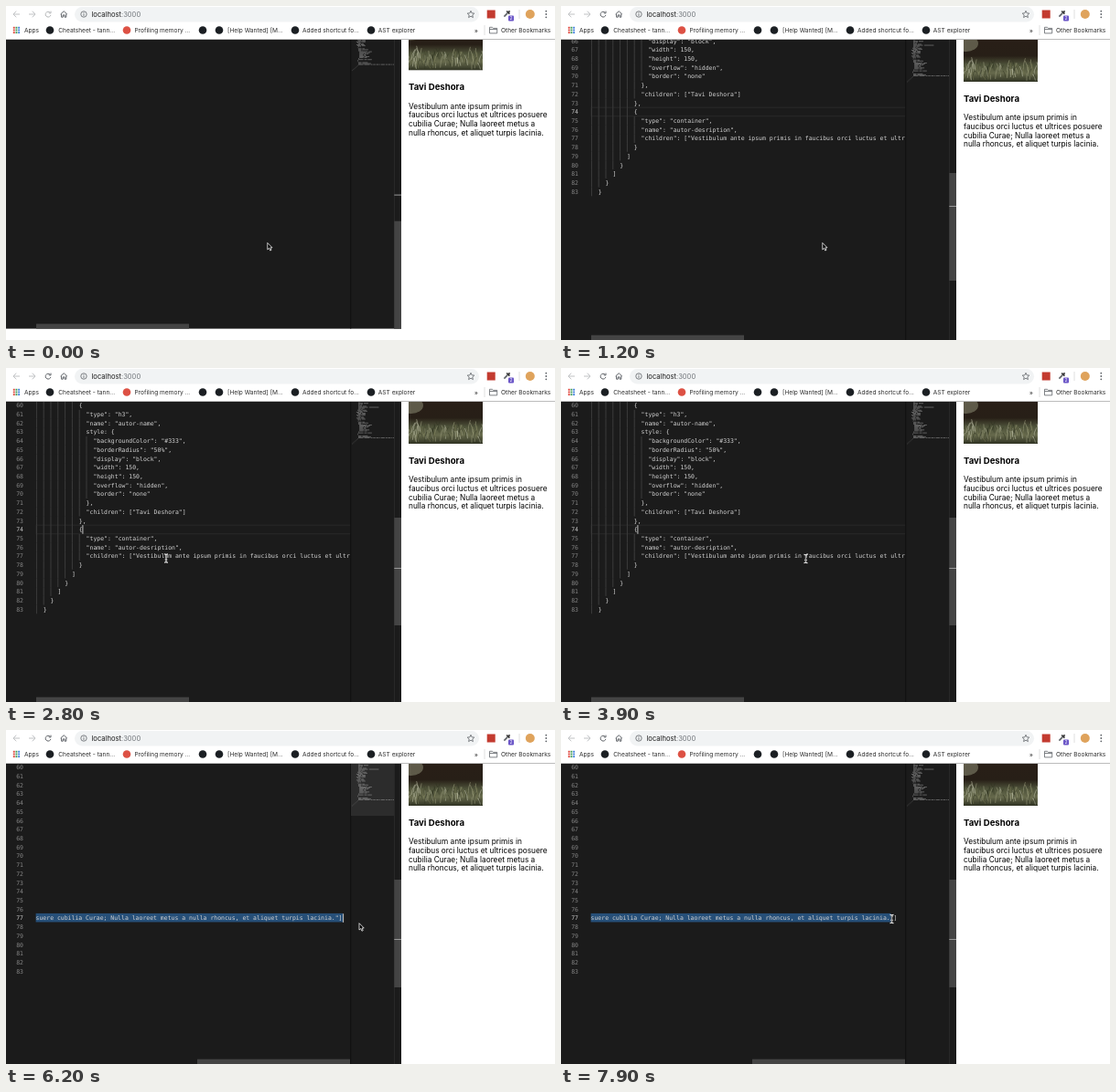
These frames come from a looping animation (600x366 px, 8 s). An HTML page:

```html
<!DOCTYPE html>
<html lang="en">
<head>
<meta charset="utf-8">
<title>Live layout editor</title>
<style>
  html, body { margin: 0; width: 100%; height: 100%; overflow: hidden; background: #fff; }
  svg { display: block; }
  text { font-family: Inter, "Liberation Sans", sans-serif; }
  .mono text { font: 6.478px "DejaVu Sans Mono", monospace; fill: #d2d2d2; }
  .mono .num { fill: #858585; text-anchor: end; }
  .mono .num.on { fill: #c6c6c6; }
  .bar text { font-size: 6.6px; fill: #2c2c2c; }
  .bar .address { font-size: 7.6px; fill: #1c1c1c; }
  .para text { font-size: 8.28px; }
  .icon { fill: none; stroke: #5f6368; stroke-width: 1; }
</style>
</head>
<body>
<svg width="600" height="366" viewBox="0 0 600 366">
  <defs>
    <clipPath id="codeClip"><rect x="32.6" y="0" width="343.6" height="366"/></clipPath>
    <clipPath id="mapClip"><rect x="377" y="0" width="47" height="366"/></clipPath>
    <clipPath id="photoClip"><rect x="440" y="20" width="81" height="63"/></clipPath>
    <linearGradient id="meadow" x2="0" y2="1">
      <stop offset="0" stop-color="#2a1e17"/><stop offset=".55" stop-color="#271f17"/>
      <stop offset=".7" stop-color="#4d5139"/><stop offset=".85" stop-color="#66694c"/>
      <stop offset="1" stop-color="#2f3222"/>
    </linearGradient>
  </defs>
  <rect width="600" height="366" fill="#fff"/>

  <g id="page">
    <rect width="432" height="366" fill="#1b1b1b"/>
    <g class="mono">
      <rect id="current" x="33" width="343.5" y="172.2" height="9.5" fill="none" stroke="#282828"/>
      <g id="nums"></g>
      <g clip-path="url(#codeClip)">
        <g id="code">
          <rect id="selection" y="200.9" height="9.6" fill="#264f78"/>
          <path id="guides" stroke="#464646" stroke-width=".8"/>
          <g id="lines"></g>
          <rect id="caret" width="1" height="9.6" fill="#c8c8c8"/>
        </g>
      </g>
    </g>
    <rect x="376.2" width="1" height="366" fill="#101010"/>
    <rect id="slider" x="377" y="37" width="47" height="57" fill="#2c2c2c"/>
    <g clip-path="url(#mapClip)"><path id="minimap" stroke="#b0b0b0" stroke-width=".65" opacity=".7"/></g>
    <rect x="424" width=".6" height="366" fill="#323232"/>
    <rect id="thumbV" x="424.3" y="164" width="7.7" height="118" fill="#444"/>
    <rect id="mark" x="424.3" width="7.7" height="1" fill="#999"/>
    <rect id="thumbH" y="360.7" width="167" height="5.3" fill="#444"/>

    <g clip-path="url(#photoClip)">
      <rect x="440" y="20" width="81" height="63" fill="url(#meadow)"/>
      <ellipse cx="443" cy="41" rx="13" ry="9" fill="#8b8a72" opacity=".55"/>
      <g id="grass" fill="none" stroke-width=".7"></g>
    </g>
    <text x="440" y="104.8" font-size="9.6" font-weight="700">Tavi Deshora</text>
    <g class="para">
      <text x="440" y="125.2">Vestibulum ante ipsum primis in</text>
      <text x="440" y="134.9">faucibus orci luctus et ultrices posuere</text>
      <text x="440" y="144.6">cubilia Curae; Nulla laoreet metus a</text>
      <text x="440" y="154.3">nulla rhoncus, et aliquet turpis lacinia.</text>
    </g>
  </g>
  <rect id="pageThumb" x="597" y="76" width="3" height="289" fill="#7c7c7c"/>

  <g class="bar">
    <rect width="600" height="37" fill="#fff"/>
    <rect y="36" width="600" height="1" fill="#bbb"/>
    <rect x="75" y="1" width="442" height="16.4" rx="8.2" fill="#f1f3f4"/>
    <g class="icon">
      <path d="M15 9H8m3.2-3.3L8 9l3.2 3.3M25 9h7m-3.2-3.3L32 9l-3.2 3.3" stroke="#c0c2c4"/>
      <path id="reload" d="M48.2 7.2A2.9 2.9 0 1 0 48.9 9.9M49 5.6V7.9H46.7"/>
      <path d="M59.6 9l3.6-3.3L66.8 9M60.6 8.6v3.6h1.7V9.9h1.8v2.3h1.7V8.6"/>
      <circle cx="85" cy="9" r="3.2" stroke-width=".8"/><path d="M85 8.5v2.3M85 6.9v.8" stroke-width=".9"/>
      <path d="M508 5.3l1.1 2.5 2.7.3-2 1.8.6 2.7-2.4-1.4-2.4 1.4.6-2.7-2-1.8 2.7-.3z" stroke-width=".8"/>
      <path d="M561 4v10M523 21v11" stroke="#ccc" stroke-width=".6"/>
      <path d="M528.5 23.3h3l1 1.1h4.2v5.5h-8.2zM528.5 25.5h8.2" stroke-width=".8"/>
      <path d="M544.4 11.6l3.8-4" stroke-width="1.6"/><path d="M547.2 5.5l3.2 3.2M549 7l1.6-1.6" stroke="#333" stroke-width="1.7"/>
    </g>
    <text class="address" x="93.5" y="11.8">localhost<tspan fill="#70757a">:3000</tspan></text>
    <rect x="525.7" y="4.5" width="9" height="9" fill="#c33b30"/>
    <rect x="549" y="10.5" width="6" height="6" rx="1" fill="#6a55c7"/>
    <text x="550.6" y="15.3" style="font-size:5px;fill:#fff">2</text>
    <circle cx="572.8" cy="9" r="5" fill="#dfa35c"/>
    <g fill="#5f6368"><circle cx="590.3" cy="5.7" r=".9"/><circle cx="590.3" cy="9" r=".9"/><circle cx="590.3" cy="12.3" r=".9"/></g>
    <g id="apps"></g>
    <g id="bookmarks"></g>
    <text x="512" y="28.8">»</text>
    <text x="541" y="28.8">Other Bookmarks</text>
  </g>

  <g id="arrow"><path d="M0 0V8.6L2 6.8 3.4 9.9 4.9 9.2 3.5 6.2H6.1Z" transform="scale(.86)" fill="#000" stroke="#fff" stroke-width=".9"/></g>
  <g id="beam" fill="none">
    <path d="M-2-4.6Q0-4.6 0-3.4Q0-4.6 2-4.6M0-3.4V3.4M-2 4.6Q0 4.6 0 3.4Q0 4.6 2 4.6M-1.2 1.5H1.2" stroke="#e8e8e8" stroke-width="1.3"/>
    <path d="M0-3.6V3.6" stroke="#222" stroke-width=".4"/>
  </g>
</svg>
<script>
const FIRST = 60, LAST = 83, CHAR = 3.9, PITCH = 9.717, LEFT = 33;
const TEXT_COL = 28, END_COL = 181, SCROLL_COLS = 95, LOOP = 8000;
const source = `            {
              "type": "h3",
              "name": "autor-name",
              style: {
                "backgroundColor": "#333",
                "borderRadius": "50%",
                "display": "block",
                "width": 150,
                "height": 150,
                "overflow": "hidden",
                "border": "none"
              },
              "children": ["Tavi Deshora"]
            },
            {
              "type": "container",
              "name": "autor-desription",
              "children": ["Vestibulum ante ipsum primis in faucibus orci luctus et ultrices posuere cubilia Curae; Nulla laoreet metus a nulla rhoncus, et aliquet turpis lacinia."]
            }
          ]
        }
      ]
    }
  }`.split('\n');

const $ = id => document.getElementById(id);
const rowY = n => 264.5 - (LAST - n) * PITCH;
const colX = c => LEFT + c * CHAR;

function add(parent, tag, attrs, text = '') {
  const el = document.createElementNS('http://www.w3.org/2000/svg', tag);
  set(el, attrs);
  el.textContent = text;
  return $(parent).appendChild(el);
}
function set(el, attrs) {
  for (const k in attrs) el.setAttribute(k, attrs[k]);
}
const show = (id, on) => set($(id), { visibility: on ? 'visible' : 'hidden' });
const move = (id, x, y) => set($(id), { transform: `translate(${x} ${y})` });

let seed = 7;
const random = () => (seed = seed * 16807 % 2147483647) / 2147483647;

// Editor rows, indent guides and minimap
const numbers = {};
let guides = '', minimap = '';
const mapRow = (n, line) => {
  for (const word of line.matchAll(/\S+/g))
    minimap += `M${377.5 + word.index * .54} ${83 - (LAST - n) * 1.08}h${word[0].length * .5}`;
};
source.forEach((line, i) => {
  const n = FIRST + i, y = rowY(n), indent = line.search(/\S/);
  numbers[n] = add('nums', 'text', { x: 19, y: y + 2.3, class: 'num' }, n);
  add('lines', 'text', { x: colX(indent), y: y + 2.3 }, line.trim());
  for (let c = 0; c < indent; c += 2) guides += `M${colX(c) + .4} ${y - PITCH / 2}v${PITCH}`;
  mapRow(n, line);
});
for (let n = 41; n < FIRST; n++) {
  const width = n == 46 ? 42 : 3 + random() * 20;
  mapRow(n, ' '.repeat(n < 49 ? 14 : 10 + n % 3 * 2) + 'x'.repeat(width / 2) + ' ' + 'x'.repeat(width / 2));
}
set($('guides'), { d: guides });
set($('minimap'), { d: minimap });

for (let i = 0; i < 90; i++) {
  const x = 438 + random() * 84, y = 68 + random() * 14, h = 4 + random() * 9, lean = random() * 8 - 4;
  add('grass', 'path', {
    d: `M${x} ${y}q0 ${-h / 2} ${lean} ${-h}`,
    stroke: ['#a3a685', '#c9cab2', '#747752', '#2e3120'][i % 4], opacity: .7
  });
}

for (let i = 0; i < 9; i++)
  add('apps', 'rect', {
    x: 7.8 + i % 3 * 2.7, y: 22.8 + (i / 3 | 0) * 2.7, width: 1.9, height: 1.9,
    fill: ['#e0483e', '#3f9b57', '#4580e0', '#e9b03c'][(i + (i / 3 | 0)) % 4]
  });
add('bookmarks', 'text', { x: 20, y: 28.8 }, 'Apps');
[
  [48, 57.3, 'Cheatsheet - tann...'], [132, 140.5, 'Profiling memory ...', '#dd5144'], [215], [233, 242, '[Help Wanted] [M...'],
  [316, 324, 'Added shortcut fo...'], [399, 406.8, 'AST explorer']
].forEach(([cx, x, label, fill = '#1b1f23']) => {
  add('bookmarks', 'circle', { cx, cy: 26.5, r: 4.3, fill });
  if (label) add('bookmarks', 'text', { x, y: 28.8 }, label);
});

// Linear interpolation through [time, ...values] keys
function track(t, keys) {
  const i = keys.findIndex(k => k[0] > t);
  if (i < 0) return keys.at(-1).slice(1);
  const a = keys[i - 1], b = keys[i], u = (t - a[0]) / (b[0] - a[0]);
  return a.slice(1).map((v, j) => v + (b[j + 1] - v) * u);
}
const pageKeys = [[0, -12.4], [200, -6], [500, -.8], [800, 0]];
const scrollKeys = [[0, -270], [100, -255], [500, -137.4], [700, -98], [900, -74], [1200, -61], [1400, -24], [1600, 0]];
const sideKeys = [[0, 0], [5700, 0], [6100, SCROLL_COLS * CHAR]];
const pointerKeys = [
  [0, 285.8, 259.5], [1400, 285.8, 259.5], [1700, 165, 198], [1800, 152, 194.5],
  [1900, 153, 201], [2300, 175, 206], [2700, 144, 208], [3300, 330, 211], [3400, 330, 211],
  [3900, 267.5, 209], [4300, 190, 210], [4400, 190, 210], [4600, 155, 222], [4700, 144, 212], [4800, 144, 212],
  [4900, 142, 208], [5700, 370, 208], [5800, 382, 209], [6200, 386, 211.7], [6700, 384, 209],
  [7000, 369, 207], [7500, 366, 207], [7900, 361.5, 207]
];

function draw(now) {
  const t = Math.floor(now % LOOP / 100) * 100;   // the picture steps ten times per second
  const [page] = track(t, pageKeys), [scroll] = track(t, scrollKeys), [side] = track(t, sideKeys);
  const [x, y] = track(t, pointerKeys);
  const selecting = t >= 4900, line = selecting ? 77 : 74;
  const arrow = t < 1900 || t >= 5800 && t < 6900;

  move('page', 0, page);
  move('nums', 0, scroll);
  move('code', -side, scroll);
  move('current', 0, scroll);
  move('thumbV', 0, -scroll * .3116);
  set($('thumbH'), { x: LEFT + side * 176 / (SCROLL_COLS * CHAR) });
  set($('mark'), { y: selecting ? 229 : 219 });
  show('current', !selecting);
  show('slider', arrow && selecting);
  show('pageThumb', t >= 100 && t < 1000);
  set($('reload'), { stroke: t < 100 ? '#b5b7b9' : '#5f6368' });
  for (const n in numbers) numbers[n].classList.toggle('on', n == line);

  const dragged = Math.round((Math.min(x, 372) + side - LEFT) / CHAR);
  const end = t < 6100 ? Math.min(END_COL, Math.max(TEXT_COL, dragged)) : t < 7700 ? END_COL : END_COL - 2;
  set($('selection'), { x: colX(TEXT_COL), width: selecting ? (end - TEXT_COL) * CHAR : 0 });
  set($('caret'), { x: colX(selecting ? end : 13) - .3, y: rowY(line) - 4.9 });
  show('caret', t >= 2800 && (selecting ? t % 1000 < 500 : t % 1000 >= 500));

  show('arrow', arrow);
  show('beam', !arrow);
  move(arrow ? 'arrow' : 'beam', x, y);
}

function tick() {
  draw(performance.now());
  requestAnimationFrame(tick);
}
tick();
</script>
</body>
</html>
```
